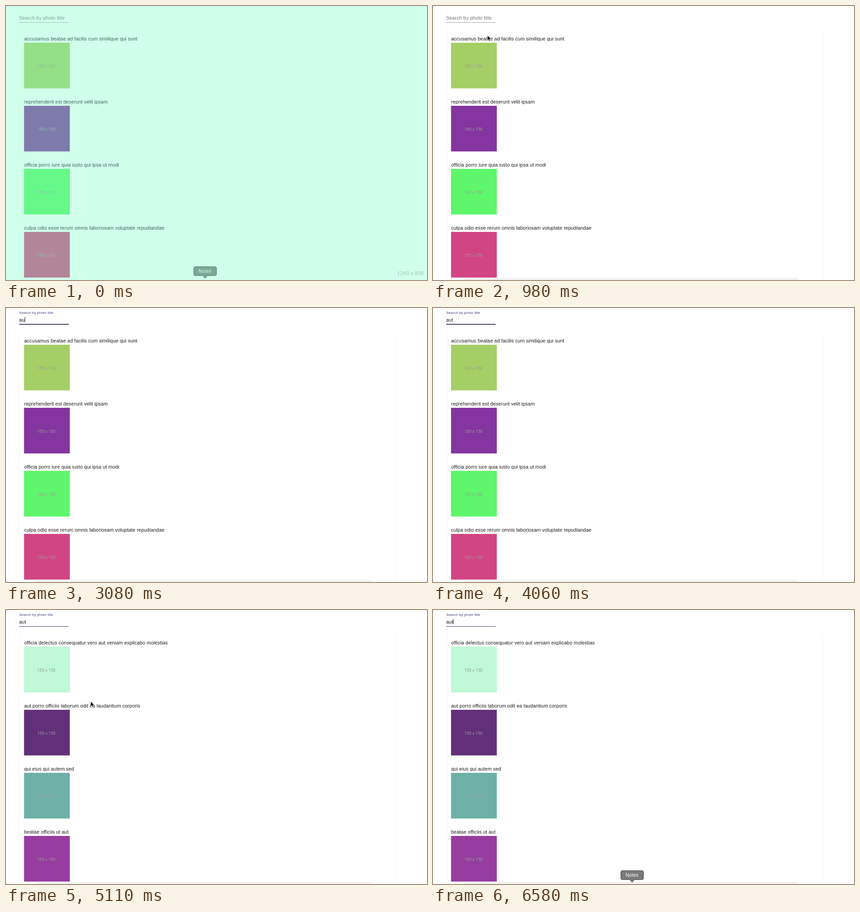
These frames come from a looping animation (927x604 px, 6860 ms). An HTML page:

```html
<!DOCTYPE html>
<html lang="en">
<head>
<meta charset="utf-8">
<title>Photo search</title>
<style>
  html, body { margin: 0; height: 100%; overflow: hidden; background: #ccc; }
  svg { display: block; width: 927px; height: 604px; }
  text { font: 10.77px "Liberation Sans", Arial, sans-serif; letter-spacing: .00938em; fill: #1c1c1c; white-space: pre; }
  .size { font: 9.2px Roboto, sans-serif; letter-spacing: 0; fill: #9c9c9c; text-anchor: middle; }
  #notes text { font-size: 10.8px; fill: #fff; text-anchor: middle; }
  #capture text { font: 11px Lato, sans-serif; letter-spacing: .03em; fill: #9bc5b4; }
</style>
</head>
<body>
<svg viewBox="0 0 927 604">
  <rect width="927" height="604" rx="3" fill="#fff"/>
  <g id="frame">
    <path d="M29 53V604M858 53V604" stroke="#f4f4f4"/>
    <rect x="66" y="599.5" width="740" height="12" rx="5" fill="#f1f1f1"/>
  </g>
  <text id="label" fill="#777"></text>
  <rect x="29" y="35.8" width="109" height=".9" fill="#999"/>
  <rect id="hover" x="29" y="35" width="109" height="1.5" fill="#2d2d3c"/>
  <rect id="focus" y="35.8" height=".9" fill="#56548c"/>
  <text id="typed" x="29" y="29.5"></text>
  <rect id="caret" y="19.5" width="1" height="12" fill="#222"/>
  <g id="list"></g>
  <g id="notes">
    <path d="M417 574.5H460a3.5 3.5 0 0 1 3.5 3.5V591a3.5 3.5 0 0 1-3.5 3.5H443.500L438.500 600.500 433.500 594.500H417a3.500 3.500 0 0 1-3.500-3.500V578a3.500 3.500 0 0 1 3.500-3.500Z" fill="#7a7a7a" stroke="#4a4a4a"/>
    <text x="438" y="588">Notes</text>
  </g>
  <path id="arrow" d="M0 0V10.800L2.500 8.500 4.200 12.400 6 11.600 4.300 7.800H7.800Z" fill="#000" stroke="#fff" stroke-width=".6"/>
  <path id="beam" d="M-2.500-5.500Q0-5.500 0-4V4Q0 5.500-2.500 5.500M2.500-5.500Q0-5.500 0-4M0 4Q0 5.500 2.500 5.500M-1.500 1.500H1.500" fill="none" stroke="#222"/>
  <g id="capture">
    <rect width="927" height="604" fill="#75ffc4" fill-opacity=".34"/>
    <text x="861" y="592.5">1240 x 808</text>
  </g>
</svg>
<script>
const LOOP = 6860, STEP = 70;
const FOCUS = 1818, HOVER = 1230, LEAVE = 4600, RESULTS = 5110;
const $ = id => document.getElementById(id);
const show = (id, on) => $(id).setAttribute('visibility', on ? 'visible' : 'hidden');
const set = (id, attrs) => {
  for (const name in attrs) $(id).setAttribute(name, attrs[name]);
};
const clamp = v => Math.max(0, Math.min(1, v));
const mix = (a, b, p) => a + (b - a) * p;

const allPhotos = [
  ['accusamus beatae ad facilis cum similique qui sunt', '#a3cf66'],
  ['reprehenderit est deserunt velit ipsam', '#84359f'],
  ['officia porro iure quia iusto qui ipsa ut modi', '#5ef66b'],
  ['culpa odio esse rerum omnis laboriosam voluptate repudiandae', '#d24583'],
];
const foundPhotos = [
  ['officia delectus consequatur vero aut veniam explicabo molestias', '#bff9d6'],
  ['aut porro officiis laborum odit ea laudantium corporis', '#62307a'],
  ['qui eius qui autem sed', '#6db1a6'],
  ['beatae officiis ut aut', '#963d9f'],
];

// Pointer tracks: [time, x, y]; the pointer is hidden outside them.
const tracks = [
  [[560, 438, 606], [700, 385, 500], [840, 250, 245], [980, 120, 65],
   [1120, 80, 14], [1260, 81, 29], [2589, 81, 29]],
  [[4480, 81, 29], [4620, 92, 55], [4760, 145, 140], [4900, 183, 195],
   [4970, 186.5, 201.5], [5600, 186.5, 201.5], [5670, 215, 240],
   [5810, 420.5, 499.5], [5880, 437, 526], [6019, 437, 526],
   [6160, 458, 570], [6300, 450, 606]],
];
const typing = [[2590, 'a'], [3010, 'au'], [3430, 'aut']];
const caretOn = [[FOCUS, 2310], [2590, 3990], [4480, 5110], [5500, 6020], [6580, LOOP]];

// Decelerating curve cubic-bezier(0, 0, .2, 1), solved by bisection.
function decelerate(x) {
  let lo = 0, hi = 1;
  for (let i = 0; i < 20; i++) {
    const s = (lo + hi) / 2;
    if (.6 * (1 - s) * s * s + s ** 3 < x) lo = s; else hi = s;
  }
  return 3 * (1 - lo) * lo * lo + lo ** 3;
}

function pointerAt(t) {
  for (const track of tracks) {
    for (let i = 1; i < track.length; i++) {
      const [t0, x0, y0] = track[i - 1], [t1, x1, y1] = track[i];
      if (t >= t0 && t <= t1) {
        const p = (t - t0) / (t1 - t0);
        return [mix(x0, x1, p), mix(y0, y1, p)];
      }
    }
  }
}

let listed;
function showPhotos(photos) {
  if (listed === photos) return;
  listed = photos;
  $('list').innerHTML = photos.map(([title, color], i) => `
    <g transform="translate(0 ${139 * i})">
      <text x="40" y="76.3">${title}</text>
      <rect x="39.7" y="81" width="100.8" height="100.6" fill="${color}"/>
      <text class="size" x="89" y="135.6">150 x 150</text>
    </g>`).join('');
}

function render(t) {
  const capturing = t < 70;
  show('capture', capturing);
  show('frame', !capturing);
  show('notes', t < 630 || t >= 6230);
  showPhotos(t < RESULTS ? allPhotos : foundPhotos);

  const p = decelerate(clamp((t - FOCUS) / 200));
  const tint = [75, 70, 130].map(c => Math.round(mix(119, c, p)));
  set('label', { transform: `translate(29 ${mix(29.8, 12.5, p)}) scale(${mix(1, .75, p)})` });
  $('label').style.fill = `rgb(${tint})`;
  set('focus', { x: 83.5 - 54.5 * p, width: 109 * p });
  set('hover', { opacity: clamp((t - HOVER) / 200) * clamp(1 - (t - LEAVE) / 200) });

  const text = typing.reduce((now, [at, value]) => t >= at ? value : now, '');
  $('typed').textContent = text;
  set('caret', { x: 29 + (text ? $('typed').getComputedTextLength() : 0) });
  show('caret', caretOn.some(([from, to]) => t >= from && t < to));

  const pointer = pointerAt(t);
  const [x, y] = pointer || [0, 0];
  const inField = x > 29 && x < 138 && y > 17 && y < 37;
  show('arrow', pointer && !inField);
  show('beam', pointer && inField);
  for (const id of ['arrow', 'beam']) set(id, { transform: `translate(${x} ${y})` });
}

$('label').textContent = 'Search by photo title';
const start = performance.now();
function tick() {
  const t = (performance.now() - start) % LOOP;
  render(Math.floor(t / STEP) * STEP);
  requestAnimationFrame(tick);
}
tick();
</script>
</body>
</html>
```
